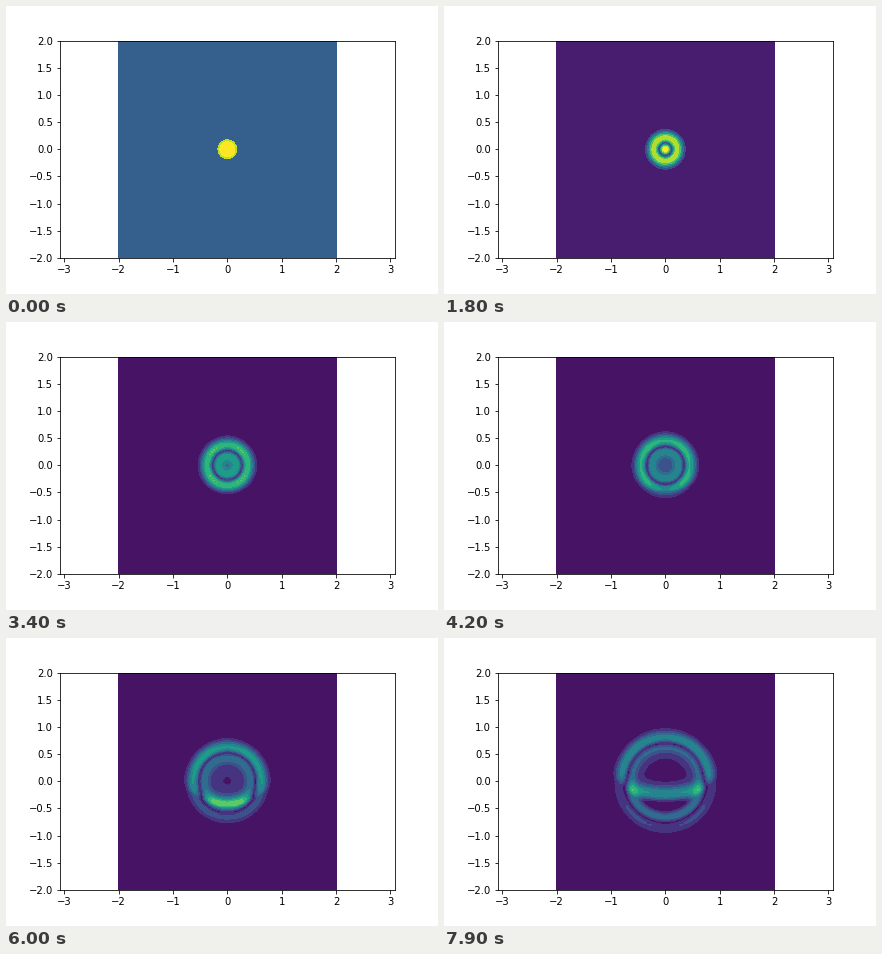
Animation of 432x288 px, one loop 8 s. Source, as a matplotlib script:

```python
import numpy as np
import matplotlib.pyplot as plt
from matplotlib.animation import FuncAnimation

FRAMES, INTERVAL = 80, 100
N, C, DT = 101, 0.985, 0.01
SIGMA, VMAX = 0.125, 0.25

axis = np.linspace(-2, 2, N)
dx = axis[1] - axis[0]
X, Y = np.meshgrid(axis, axis)


def laplacian(u):
    out = np.zeros_like(u)
    out[1:-1, 1:-1] = (u[2:, 1:-1] + u[:-2, 1:-1] + u[1:-1, 2:] + u[1:-1, :-2]
                       - 4 * u[1:-1, 1:-1]) / dx**2
    return out


def mirror(strength=18, curve=0.64, bottom=-0.5):
    """Thin, partly reflecting parabolic sheet."""
    slope = 2 * curve * X
    dist = np.abs(Y - curve * X**2 - bottom) / np.sqrt(1 + slope**2)
    return strength / dx * np.clip(1 - dist / dx, 0, None)


def simulate():
    sheet = mirror()

    def accel(u):
        return C**2 * laplacian(u) - sheet * u

    u = np.exp(-(X**2 + Y**2) / SIGMA**2)
    states = [u, u + 0.5 * DT**2 * accel(u)]
    while len(states) < FRAMES:
        prev, cur = states[-2:]
        states.append(2 * cur - prev + DT**2 * accel(cur))
    return [np.abs(s) for s in states]


waves = simulate()

plt.rcParams.update({"font.family": "DejaVu Sans", "font.size": 10})
fig = plt.figure(figsize=(6, 4), dpi=72, facecolor="white")
fig.subplots_adjust(left=0.125, right=0.9, bottom=0.125, top=0.88)
ax = fig.add_subplot()
half_width = 2 * (0.775 * 6) / (0.755 * 4)
filled = None


def draw(i):
    global filled
    if filled is not None:
        filled.remove()
    filled = ax.contourf(X, Y, waves[i], vmin=0, vmax=VMAX, cmap="viridis")
    ax.set_xlim(-half_width, half_width)
    ax.set_ylim(-2, 2)
    return [filled]


anim = FuncAnimation(fig, draw, frames=FRAMES, interval=INTERVAL,
                     init_func=lambda: [], repeat=True, repeat_delay=0)
plt.show()
```
